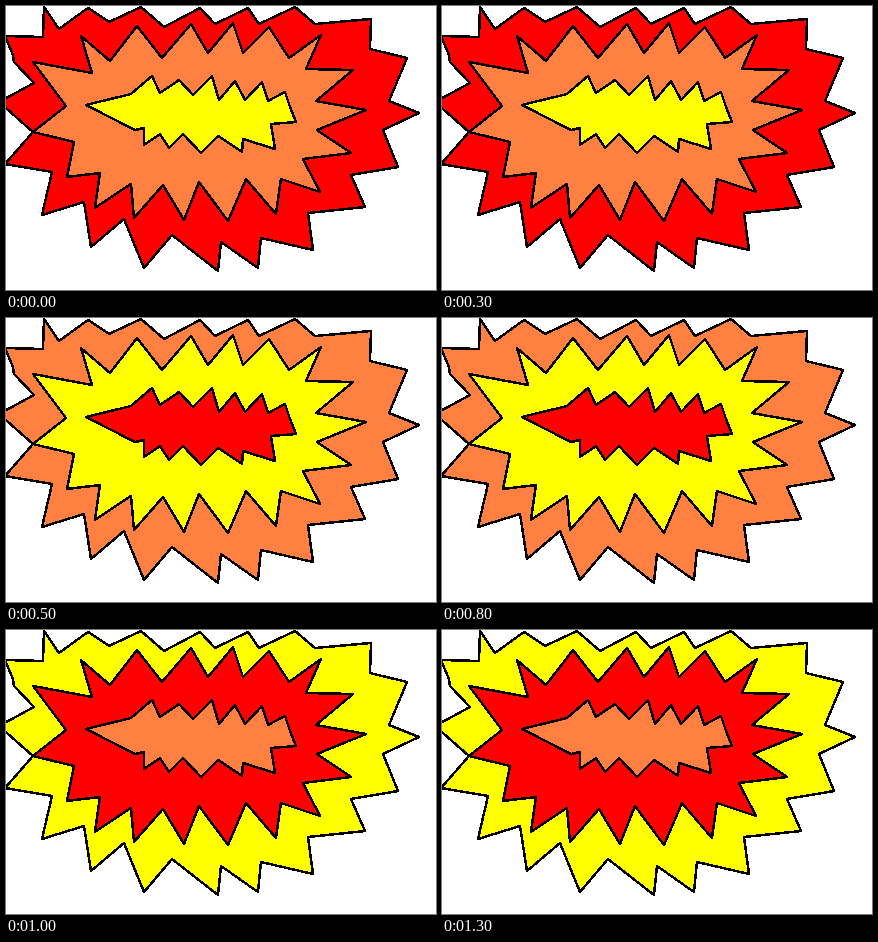
Animation, 430 px wide and 284 px high, one loop 1.5 s. Source, as an HTML page:

```html
<!DOCTYPE html>
<html>
<head>
<meta charset="utf-8">
<style>
html, body { margin: 0; width: 100%; height: 100%; overflow: hidden; background: #fff; }
svg { display: block; }
polygon {
  stroke: #000; stroke-width: 2.5; stroke-linejoin: round;
  shape-rendering: crispEdges;
  animation: cycle 1.5s step-end infinite;
}
@keyframes cycle {
  0% { fill: #f00; }
  33.3333% { fill: #ff8040; }
  66.6667% { fill: #ff0; }
}
.middle { animation-delay: -.5s; }
.core { animation-delay: -1s; }
</style>
</head>
<body>
<svg width="430" height="284" viewBox="0 0 430 284">
  <polygon class="outer" points="38,1 53,23 82,2 103,16 135,1 158,21 194,2 209,18 242,2 253,18 289,1 309,18 365,13 364,43 401,52 383,95 413,107 377,124 392,161 345,169 359,201 302,207 307,244 255,232 252,262 215,236 212,265 166,229 138,262 118,213 85,241 78,196 36,209 46,166 -1,158 27,126 -7,96 28,77 8,56 7,49 -1,30 37,31"/>
  <polygon class="middle" points="75,30 104,55 131,20 156,52 185,18 202,47 227,17 237,47 263,21 283,52 315,29 300,63 347,64 310,95 360,104 311,124 345,147 297,153 314,186 275,173 270,208 240,173 222,215 193,176 178,214 157,179 128,212 125,178 89,202 94,167 61,171 68,136 27,126 60,100 27,56 86,67"/>
  <polygon class="core" points="80,99 125,88 146,70 154,87 173,74 187,89 206,70 213,94 229,75 239,94 256,76 262,95 279,86 284,101 290,116 265,118 269,143 237,133 236,146 212,130 195,147 177,128 163,142 154,128 138,139 138,122 129,124"/>
</svg>
</body>
</html>
```
